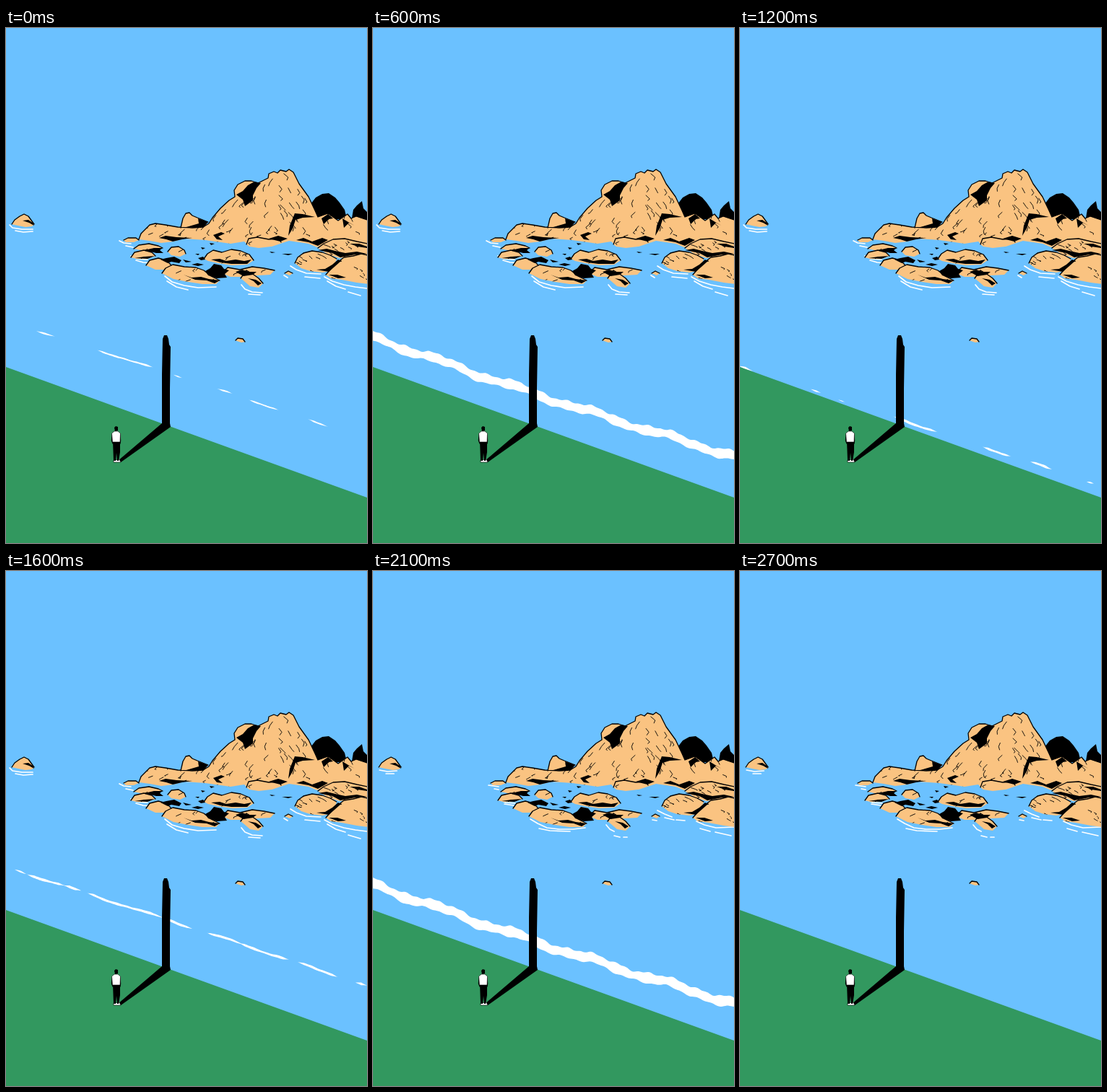
An HTML page that plays this animation: 500 px wide and 714 px high, repeating every 2800 ms.

```html
<!DOCTYPE html>
<html lang="en">
<head>
<meta charset="utf-8">
<title>Shore</title>
<style>
  html, body { margin: 0; width: 100%; height: 100%; overflow: hidden; background: #6bc1ff; }
  svg { display: block; width: 500px; height: 714px; }
  .line { fill: none; stroke: #000; stroke-linecap: round; stroke-linejoin: round; }
  .ripple { fill: none; stroke: #fff; stroke-width: 1.7; stroke-linecap: round; stroke-linejoin: round; }
</style>
</head>
<body>
<svg viewBox="0 0 500 714">
  <rect width="500" height="714" fill="#6bc1ff"/>

  <g class="ripple" id="rippleA">
    <path d="M5 273L9 277L22 279L37 279M13 281L24 283L37 282"/>
    <path d="M157 295L163 298L173 299M166 302L176 304M173 316L182 320L196 321M180 322L190 325L203 326"/>
    <path d="M220 344L230 352L247 357L266 360L291 359M223 351L236 359L252 363"/>
    <path d="M326 356L331 362L341 366L355 367M336 369L352 370M385 343L390 346"/>
    <path d="M394 330L402 335L416 340L436 341M414 345L435 347"/>
    <path d="M441 345L452 351L468 356L484 359L500 361M445 351L457 358L470 362M474 366L491 371"/>
  </g>
  <g class="ripple" id="rippleB">
    <path d="M9 276L20 278L33 277M18 281L29 281"/>
    <path d="M160 297L174 299M168 302L174 303M175 317L184 321L197 322M182 323L195 325"/>
    <path d="M218 344L228 350L241 356L258 358L277 358L294 356M230 357L245 360L273 361"/>
    <path d="M323 352L328 358L334 361M334 367L342 369M347 369L352 369M387 345L393 346"/>
    <path d="M394 332L404 337L414 341M404 342L417 345M420 345L432 346"/>
    <path d="M448 347L459 352L475 356L500 355M453 357L467 361M474 362L496 367"/>
  </g>

  <path d="M422 244L429 235L438 230L447 229L456 235L462 242L469 252L472 264L430 268ZM479 264L481 252L486 246L493 240L495 250L500 255V268Z"/>
  <clipPath id="onRock"><path id="rockArea"/></clipPath>
  <path id="rocks" fill="#fac381"/>
  <path id="crests" class="line" stroke-width="1.3"/>
  <path id="cracks" class="line" stroke-width=".9" clip-path="url(#onRock)"/>

  <!-- shaded faces and pools -->
  <path d="M23 267L31 266L37 270L39 274L32 270Z
    M266 264L280 269L274 276L246 277L267 271Z
    M319 231L328 226L335 218L344 213L353 215L347 222L342 232L342 239L331 247L328 238Z
    M391 288L393 274L400 257L411 258L428 262L411 263L401 266L397 278Z
    M437 264L446 258L453 264L447 265L440 272Z
    M466 264L474 269L483 274L475 270L468 277Z
    M212 291L221 288L236 290L258 291L244 293L231 296L222 293Z
    M287 287L298 283L303 285L294 289L300 294L292 293Z
    M364 292L377 288L390 292L380 296Z
    M402 294L412 291L424 296L438 291L446 294L432 302L419 297Z"/>
  <path d="M192 308L205 305L217 305L213 308L218 312L208 312Z
    M222 319L233 317L243 322L240 326L229 324L224 326L214 321Z
    M178 319L192 317L206 316L196 320Z
    M246 342L257 346L270 345L281 348L296 350L289 354L278 350L262 349Z
    M276 337L283 333L288 327L298 329L302 334L309 336L303 341L306 346L292 347L280 343Z
    M284 321L296 320L305 323L318 321L330 323L340 321L334 327L312 327L297 325Z
    M318 338L327 335L336 338L347 338L342 342L329 344Z
    M335 347L346 349L354 354L349 357L343 351Z
    M432 308L444 306L456 309L470 312L486 310L500 313L484 314L463 318L452 312Z
    M430 335L442 334L452 328L460 321L464 323L455 331L447 338Z
    M447 342L459 342L471 346L460 347Z
    M476 299L489 299L500 303V305L487 303Z"/>
  <path d="M245 321L257 324L249 325ZM257 328L265 326L274 328L266 330ZM262 313L268 313L266 315ZM270 304L276 305L272 307ZM266 319L273 317L276 321L270 322ZM282 298L289 299L284 301ZM365 310L373 311L368 312ZM382 313L397 313L391 315Z"/>

  <path id="wave" fill="#fff"/>
  <path d="M0 470L500 651V714H0Z" fill="#32985f"/>

  <!-- cast shadow and figure -->
  <path d="M155 600L216 548L216 480L217 431L219 426L223 426L225 431L226 439L228 442L227 500L227 548L228 553L159 602Z"/>
  <path d="M149 599L157 598L159 602L149 602Z" fill="#fff" stroke="#000" stroke-width=".6"/>
  <path d="M148 573H158V588L156 600H154L153 589L152 600H149Z"/>
  <path d="M147 564L146.500 572L148 576M158 564L158.500 572L158 576" class="line" stroke-width="1.4"/>
  <path d="M150 559H155L158.500 562L158 574H147.500L146.500 562Z" fill="#fff" stroke="#000" stroke-width=".6"/>
  <path d="M150 554L152 552L155 553L155 558L151 559Z"/>
</svg>

<script>
const STEP = 100, CYCLE = 1400, LANDING = 1200;
const byId = id => document.getElementById(id);
const setPath = (id, d) => byId(id).setAttribute("d", d);

// Each rock: an inked crest from left to right, then its bare waterline back.
const rocks = [
  ["8 272 12 266 19 261 25 258 31 261 39 272", "36 275 27 276 17 274"],
  ["163 294 169 291 180 291 184 294", "177 297 166 297"],
  ["242 277 245 264 249 257 254 256 258 260 265 263 280 269", "274 276"],
  ["184 293 187 285 193 279 199 273 207 271 221 273 238 276 258 277 273 276 281 271 286 263 297 250 309 239 317 234 316 225 321 217 331 212 340 212 349 215 363 208 364 202 371 199 376 201 380 197 388 199 392 196 398 200 406 216 419 234 428 253 432 262 446 257 460 267 473 258 478 264 485 261 500 266",
   "500 300 484 296 468 292 444 299 431 304 419 299 392 295 368 303 336 302 330 296 311 299 276 294 246 292 232 296 215 298 199 295"],
  ["333 300 336 292 348 290 364 293 378 292 381 297", "367 303 350 305 337 303"],
  ["177 306 184 301 198 299 211 302 217 305", "207 309 191 309"],
  ["173 318 178 311 191 308 202 311 207 316", "196 320 181 320"],
  ["224 310 229 304 239 303 247 308 249 313", "241 317 229 315"],
  ["194 329 199 322 211 319 222 322 229 329", "222 335 207 335"],
  ["216 340 221 333 231 328 247 331 263 332 274 336 284 344 296 350", "291 355 272 355 252 352 232 348"],
  ["274 320 279 313 287 308 299 311 312 307 325 309 337 314 343 322", "334 328 313 329 294 326 280 323"],
  ["299 340 307 332 324 335 341 331 357 333 372 336", "366 342 349 343 329 345 311 345"],
  ["325 347 333 336 343 342 350 347 356 354", "350 360 338 358 330 351"],
  ["386 340 391 337 397 340", "393 343"],
  ["318 433 321 430 328 431 331 435", "326 436 320 434"],
  ["432 305 440 299 453 293 469 292 486 296 501 299", "501 316 480 317 462 319 446 314"],
  ["400 326 404 318 412 312 424 309 438 311 449 315 458 320", "455 329 449 337 438 339 421 337 409 333"],
  ["443 342 450 334 459 325 468 318 481 316 492 313 501 315", "501 355 486 353 465 349 450 347"],
];

function seeded(seed) {
  return () => (seed = seed * 16807 % 2147483647) / 2147483647;
}

function drawRocks() {
  const area = rocks.map(([crest, base]) => `M${crest} ${base}Z`).join("");
  setPath("rocks", area);
  setPath("rockArea", area);
  setPath("crests", rocks.map(([crest]) => "M" + crest).join(""));

  // Short cracks run down and away from the peak.
  const random = seeded(11);
  let cracks = "";
  for (let i = 0; i < 190; i++) {
    const x = 185 + 315 * random(), y = 200 + 150 * random();
    const lean = (x < 370 ? -1 : 1) * (2 + 4 * random());
    const bend = 6 * random() - 3, drop = y < 280 ? 5 : 2;
    cracks += `M${x} ${y}l${lean} ${drop}l${bend} ${drop * random()}`;
  }
  setPath("cracks", cracks);
}

// Foam dashes as [centre, half length]: out at sea, and left behind on the shore.
const offshore = [[20, -6], [55, 12], [92, -2], [165, 38], [238, 6], [303, 10], [357, 20], [432, 13], [492, -6]];
const ashore = [[8, 9], [105, 7], [141, 4], [243, 30], [356, 19], [417, 15], [485, 5]];

function wavePath(t) {
  if (t > LANDING) return "";
  const swell = Math.sin(Math.PI * t / CYCLE) ** 2;
  const distance = 64 * (1 - (t / LANDING) ** 1.5);
  const thickness = 1.1 + 5.5 * swell ** 1.5;
  const arriving = t < CYCLE / 2;
  const dashes = arriving ? offshore : ashore;
  const growth = arriving ? .07 * t : .2 * (LANDING - t);
  const top = [], bottom = [];

  for (let x = 0; x <= 500; x += 2) {
    const reach = Math.max(...dashes.map(([centre, half]) => half + growth - Math.abs(x - centre)));
    const taper = Math.min(1, Math.max(0, reach / 8));
    const bow = (7 * swell - 2) * Math.sin(Math.PI * x / 500);
    const y = 470 + .33 * x - distance + bow + (.8 + 2 * swell) * Math.sin(x * .06 - 1.1);
    const half = thickness * taper;
    const edge = (rate, phase) => half * (1 + .2 * Math.sin(x * rate + phase) + .12 * Math.sin(x * rate * 2.3 + t));
    top.push(`${x} ${(y - edge(.17, 0)).toFixed(1)}`);
    bottom.unshift(`${x} ${(y + edge(.13, 2)).toFixed(1)}`);
  }
  return `M${top.join("L")}L${bottom.join("L")}Z`;
}

const show = (id, on) => byId(id).style.display = on ? "" : "none";

function draw() {
  const tick = Math.floor(performance.now() / STEP);
  setPath("wave", wavePath(tick * STEP % CYCLE));
  show("rippleA", tick % 2 === 0);
  show("rippleB", tick % 2 === 1);
  requestAnimationFrame(draw);
}

drawRocks();
draw();
</script>
</body>
</html>
```
